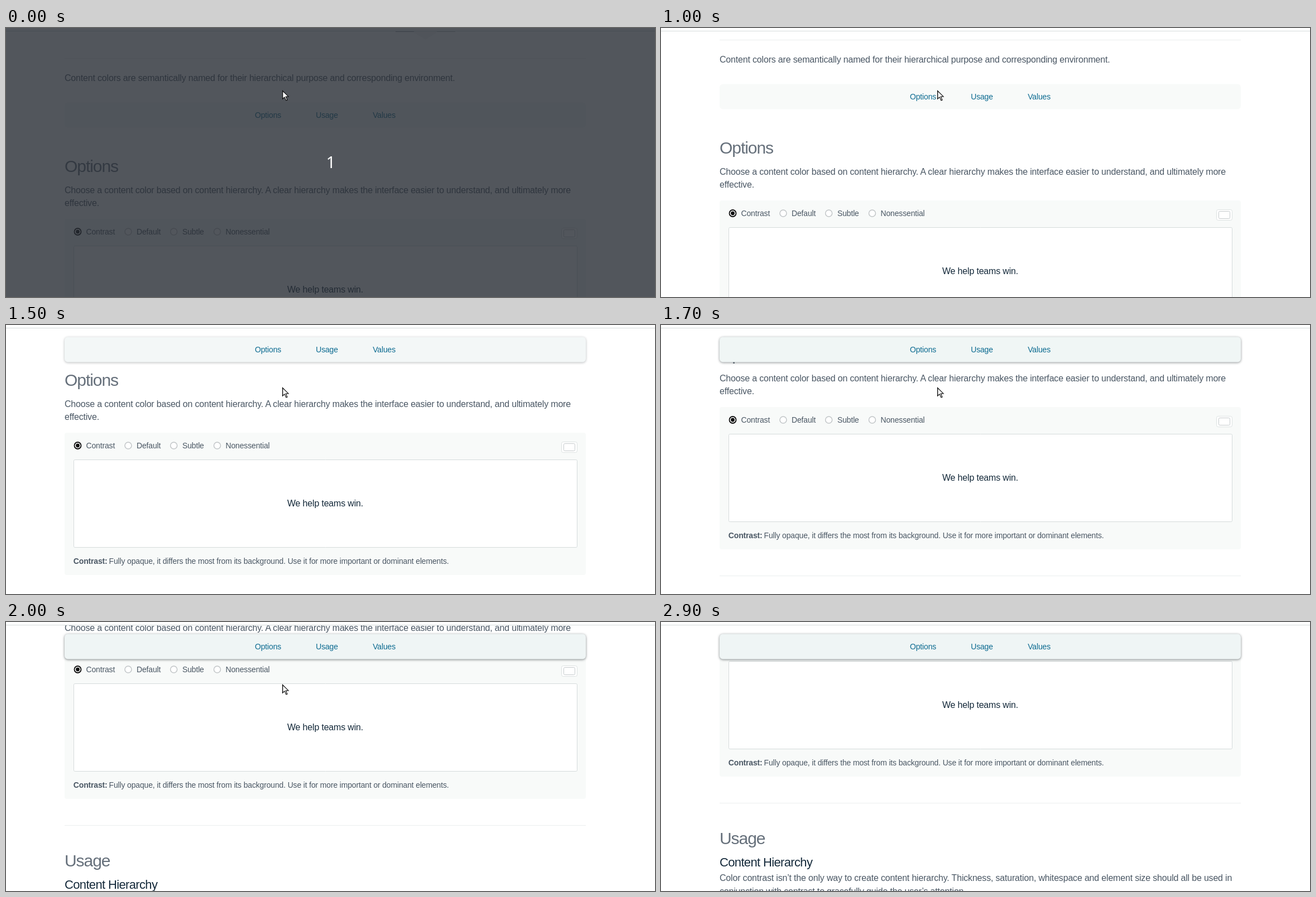
These frames come from a looping animation (1163x482 px, 3.4 s). An HTML page with a canvas:

```html
<!DOCTYPE html>
<html lang="en">
<head>
<meta charset="utf-8">
<title>Content colors</title>
<style>
  html, body { margin: 0; width: 100%; height: 100%; overflow: hidden; background: #fff; }
  canvas { display: block; }
</style>
</head>
<body>
<canvas id="stage" width="1163" height="482"></canvas>
<script>
const W = 1163, H = 482, LOOP = 3400, STEP = 100;
const LEFT = 105, RIGHT = 1039;
const NAV_Y = 133.5, NAV_H = 45, NAV_TOP = 21.5;
const SANS = '"Liberation Sans", Arial, sans-serif';
const INK = '#14293a', BODY = '#4a5764', HEAD = '#66707b', LINK = '#0b6a90';
const PANEL = '#f8faf9', RULE = '#ebeeee', EDGE = '#d5dbdb';

const ctx = document.getElementById('stage').getContext('2d');
ctx.textRendering = 'optimizeLegibility';

// Wheel scrolling, one value per step from 1000 ms, then a last notch.
const SCROLL_START = 1000;
const SCROLL = [33, 53, 78, 102, 126, 149, 160, 195, 232, 262, 280];
const SCROLL_END = 320;

function scrollAt(t) {
  if (t < SCROLL_START) return 0;
  if (t >= 2300) return SCROLL_END;
  const i = Math.floor((t - SCROLL_START) / STEP);
  return SCROLL[Math.min(i, SCROLL.length - 1)];
}

function pointerAt(t) {
  if (t >= 2900) return null;
  const u = Math.min(1, Math.max(0, (t - 2400) / 300));
  const k = u * u * (3 - 2 * u);
  return { x: 495 - 426 * k, y: 111 - 104 * k };
}

function text(str, x, y, { size = 16, color = BODY, weight = 400, spacing = -0.0115 * size, align = 'left' } = {}) {
  ctx.font = `${weight} ${size}px ${SANS}`;
  ctx.letterSpacing = spacing + 'px';
  ctx.textAlign = align;
  ctx.fillStyle = color;
  ctx.fillText(str, x, y);
}

function rect(x, y, w, h, color) {
  ctx.fillStyle = color;
  ctx.fillRect(x, y, w, h);
}

function rounded(x, y, w, h, r, fill, stroke) {
  const inset = stroke ? 0.5 : 0;
  ctx.beginPath();
  ctx.roundRect(x + inset, y + inset, w - 2 * inset, h - 2 * inset, r);
  ctx.fillStyle = fill;
  ctx.fill();
  if (stroke) {
    ctx.strokeStyle = stroke;
    ctx.lineWidth = 1;
    ctx.stroke();
  }
}

function polygon(points, fill) {
  ctx.beginPath();
  points.forEach(([x, y]) => ctx.lineTo(x, y));
  ctx.closePath();
  ctx.fillStyle = fill;
  ctx.fill();
}

function radio(x, y, label, labelX, on) {
  ctx.beginPath();
  ctx.arc(x, y, 6, 0, 7);
  ctx.fillStyle = '#fff';
  ctx.fill();
  ctx.strokeStyle = on ? '#0c0c0c' : '#c2c6c8';
  ctx.lineWidth = on ? 1.8 : 1.5;
  ctx.stroke();
  if (on) {
    ctx.beginPath();
    ctx.arc(x, y, 3.4, 0, 7);
    ctx.fillStyle = '#0c0c0c';
    ctx.fill();
  }
  text(label, labelX, y + 5, { size: 14 });
}

function heading(str, y) {
  text(str, LEFT, y, { size: 30, color: HEAD, spacing: -1.05 });
}

function drawExample() {
  rounded(LEFT, 342, RIGHT - LEFT, 255, 4, PANEL);
  radio(128.5, 365, 'Contrast', 143.5, true);
  radio(219, 365, 'Default', 234);
  radio(300.7, 365, 'Subtle', 316);
  radio(378.5, 365, 'Nonessential', 393.5);
  rounded(995, 358, 29, 20, 3, '#fff', '#dde2e2');
  rounded(999, 361, 21, 14, 2, '#fff', '#c5cacc');
  rounded(121, 390, 903, 158, 2, '#fff', EDGE);
  text('We help teams win.', 572, 474, { color: INK, align: 'center' });
  text('Contrast:', 120.8, 577, { size: 14, weight: 700 });
  text('Fully opaque, it differs the most from its background. Use it for more important or dominant elements.',
    184.6, 577, { size: 14 });
}

function drawPage(scroll) {
  ctx.save();
  ctx.translate(0, -scroll);
  rect(698, 6, 34, 1, '#a3a8aa');
  rect(771, 6, 34, 1, '#c3c8c8');
  polygon([[731, 6], [772, 6], [771, 9], [751.5, 20.5], [732, 9]], '#f6f8f8');
  rect(LEFT, 54, RIGHT - LEFT, 1, RULE);
  text('Content colors are semantically named for their hierarchical purpose and corresponding environment.', LEFT, 95);
  heading('Options', 258);
  text('Choose a content color based on content hierarchy. A clear hierarchy makes the interface easier to understand, and ultimately more', LEFT, 296);
  text('effective.', LEFT, 319);
  drawExample();
  rect(LEFT, 644, RIGHT - LEFT, 1, RULE);
  heading('Usage', 718);
  text('Content Hierarchy', LEFT, 758, { size: 22, color: INK, spacing: -0.65 });
  text('Color contrast isn’t the only way to create content hierarchy. Thickness, saturation, whitespace and element size should all be used in', LEFT, 784);
  text('conjunction with contrast to gracefully guide the user’s attention.', LEFT, 808);
  ctx.restore();
}

function drawNav(scroll, t) {
  const y = Math.max(NAV_TOP, NAV_Y - scroll);
  const u = Math.min(1, Math.max(0, (t - 1300) / 600));
  const lift = u * (2 - u);
  const mix = (a, b) => Math.round(a + (b - a) * lift);
  ctx.save();
  if (lift) {
    ctx.shadowColor = `rgba(20, 30, 35, ${0.55 * lift})`;
    ctx.shadowBlur = 4;
    ctx.shadowOffsetY = 1;
  }
  rounded(LEFT, y, RIGHT - LEFT, NAV_H, 6, `rgb(${mix(248, 239)}, ${mix(250, 245)}, ${mix(249, 245)})`);
  ctx.restore();
  const link = { size: 14, color: LINK };
  const baseline = y + 27.5;
  text('Options', 446, baseline, link);
  text('Usage', 555.2, baseline, link);
  text('Values', 657.2, baseline, link);
}

function drawCountdown() {
  rect(0, 0, W, H, 'rgba(39, 44, 52, 0.8)');
  ctx.font = '29px "Noto Sans", "Open Sans", sans-serif';
  ctx.letterSpacing = '0px';
  ctx.textAlign = 'center';
  ctx.fillStyle = '#fff';
  ctx.fillText('1', 582, 251);
}

function drawPointer({ x, y }) {
  ctx.save();
  ctx.translate(x, y);
  polygon([[0, 0], [0, 17.5], [4, 13.8], [6.6, 19.6], [9.8, 18.4], [7.3, 12.6], [12.5, 12.4]], '#111');
  polygon([[1.4, 3.2], [1.4, 14.6], [4.4, 11.9], [7.2, 18], [8.2, 17.6], [5.5, 11.4], [9.7, 11.2]], '#fff');
  ctx.restore();
}

function draw(time) {
  const t = Math.floor((time % LOOP) / STEP) * STEP;
  const scroll = scrollAt(t);
  rect(0, 0, W, H, '#fff');
  drawPage(scroll);
  drawNav(scroll, t);
  rect(0, 0, W, 5, '#fff');
  rect(0, 5, W, 1, EDGE);
  if (t < 400) drawCountdown();
  const pointer = pointerAt(t);
  if (pointer) drawPointer(pointer);
}

const start = performance.now();
function tick() {
  draw(performance.now() - start);
  requestAnimationFrame(tick);
}
tick();
</script>
</body>
</html>
```
